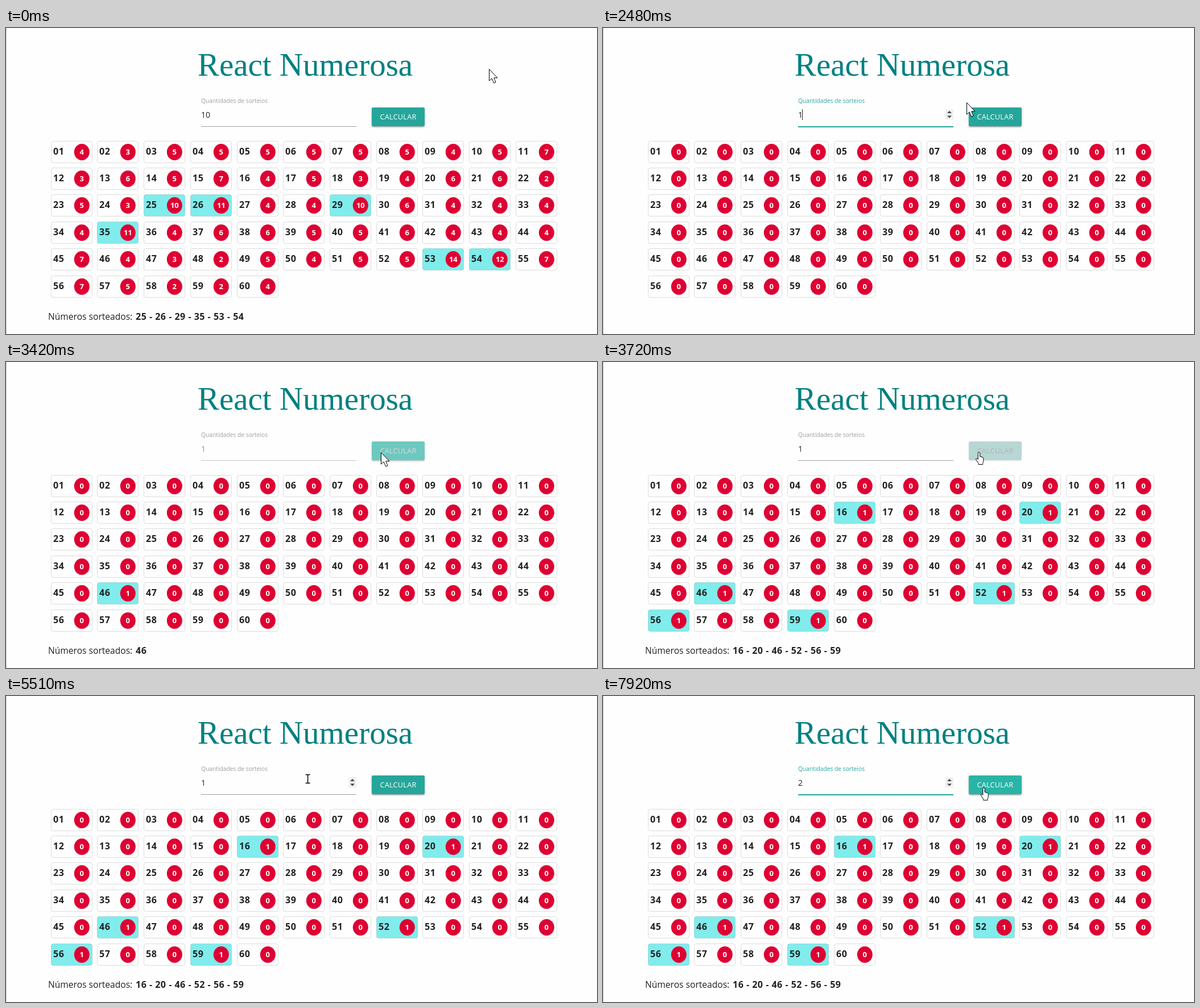
An HTML page that plays this animation: 1039x539 px, repeating every 8000 ms.

```html
<!DOCTYPE html>
<html lang="pt">
<head>
<meta charset="utf-8">
<title>React Numerosa</title>
<style>
html, body { margin: 0; width: 100%; height: 100%; overflow: hidden; background: #fefefe; }
#button {
  position: absolute; left: 643px; top: 140px; width: 93px; height: 33px; border-radius: 2px;
  box-shadow: 0 2px 2px rgba(0,0,0,calc(.14*var(--lift))),
              0 3px 1px -2px rgba(0,0,0,calc(.12*var(--lift))),
              0 1px 4px rgba(0,0,0,calc(.2*var(--lift)));
}
svg { position: absolute; left: 0; top: 0; display: block; }
text { font-family: "Open Sans", "Noto Sans", sans-serif; fill: #212121; white-space: pre; }
.title { font: 57px "Liberation Serif", serif; fill: #008080; text-anchor: middle; }
.bold { font-weight: 700; font-size: 16px; letter-spacing: .5px; }
.badge { font-weight: 700; font-size: 13px; fill: #fff; text-anchor: middle; }
</style>
</head>
<body>
<div id="button"></div>
<svg id="stage" width="1039" height="539"></svg>
<script>
const LOOP = 8000, CLEAR = 1100, BLUR = 3110, DRAW = 3410, UNLOCK = 3680, REFOCUS = 5820, RETYPE = 6900;
const TEAL = [38, 166, 154], HOVER = [43, 187, 173], OFF = [223, 223, 223], GREY = [158, 158, 158], WHITE = [255, 255, 255];

const firstDraw = { 25: 10, 26: 11, 29: 10, 35: 11, 53: 14, 54: 12 };
const secondDraw = [46, 16, 59, 52, 20, 56];

// Pointer key points: [time, x, y]
const route = [
  [2060, 849.5, 72.5], [2250, 717.5, 119.5], [2420, 717.5, 119.5], [2480, 639.5, 131.5],
  [2950, 659.5, 159.5], [5500, 659.5, 159.5], [5510, 531, 146], [5660, 466, 144],
  [7740, 466, 144], [7830, 711, 161], [7920, 668, 162.5]];

const stage = document.getElementById('stage');
const button = document.getElementById('button');

const clamp = v => Math.min(1, Math.max(0, v));
const within = (t, a, b) => t >= a && t < b;
const mix = (a, b, k) => a.map((v, i) => v + (b[i] - v) * k);
const rgb = c => `rgb(${c.map(Math.round)})`;
const ramp = (t, start) => 1 - (1 - clamp((t - start) / 300)) ** 1.7;

let seed = 7;
const random = () => (seed = seed * 16807 % 2147483647) / 2147483647;

function set(el, attrs) {
  for (const key in attrs) el.setAttribute(key, attrs[key]);
}
function add(tag, attrs, content) {
  const el = document.createElementNS('http://www.w3.org/2000/svg', tag);
  set(el, attrs);
  if (content !== undefined) el.textContent = content;
  return stage.appendChild(el);
}
const show = (el, on) => el.style.display = on ? '' : 'none';

add('rect', { width: 1, height: 539, fill: '#ccc' });
add('text', { class: 'title', x: 526, y: 84 }, 'React Numerosa');

const label = add('text', { x: 343, y: 132, 'font-size': 10.25 }, 'Quantidades de sorteios');
const value = add('text', { x: 343, y: 158, 'font-size': 14 });
const caret = add('rect', { y: 143, width: 1, height: 19, fill: '#222' });
const line = add('rect', { x: 343, y: 173, width: 273, height: 1 });
const glow = add('rect', { x: 343, y: 174, width: 273, height: 1, fill: rgb(TEAL) });
const spinner = [
  add('rect', { x: 602, y: 143, width: 14, height: 18, fill: '#f0f0f0' }),
  add('path', { d: 'M605 150l4-4 4 4zM605 154.5l4 4 4-4z', fill: '#444' })];
const caption = add('text', { x: 657.5, y: 161, 'font-size': 12.6, 'letter-spacing': .3 }, 'CALCULAR');

const cells = Array.from({ length: 60 }, (_, i) => {
  const x = Math.round(78.7 + i % 11 * 81.7);
  const y = Math.round(198.6 + Math.floor(i / 11) * 47.4);
  const box = add('rect', { x: x + .5, y: y + .5, width: 72, height: 38, rx: 3.5, stroke: '#000', 'stroke-opacity': .13 });
  add('text', { class: 'bold', x: x + 4, y: y + 23.5 }, String(i + 1).padStart(2, '0'));
  add('ellipse', { cx: x + 54.3, cy: y + 19.5, rx: 13.5, ry: 14.5, fill: '#de0032' });
  const count = add('text', { class: 'badge', x: x + 54.3, y: y + 24 });
  return { box, count, before: firstDraw[i + 1] || 2 + Math.floor(3 * (random() + random())) };
});

const heading = add('text', { x: 74, y: 514, 'font-size': 15.6, 'font-weight': 500 }, 'Números sorteados:');
const result = add('text', { class: 'bold', x: 228, y: 514 });

const solid = { fill: '#fff', stroke: '#000', 'stroke-width': 1 };
const cursors = {
  arrow: add('path', { ...solid, d: 'M0 0V20.5L4.7 16.5L8.2 24.5L11.5 23L8.2 15.3H14.5Z' }),
  hand: add('path', { ...solid, d: 'M-.2 12V1a1.7 1.7 0 0 1 3.4 0V7a1.4 1.4 0 0 1 2.2 .6V8' +
    'a1.4 1.4 0 0 1 2.2 .7a1.2 1.2 0 0 1 1.7 1.2V15q0 2-1.2 4V21H.7V19L-3.5 12.6a1.5 1.5 0 0 1 2.4-1.8Z' }),
  beam: add('path', { fill: 'none', stroke: '#000', 'stroke-width': 1.5,
    d: 'M-4-7.5H-1L0-6.5L1-7.5H4M0-6.5V6.5M-4 7.5H-1L0 6.5L1 7.5H4' })
};

function pointerAt(t) {
  const next = route.findIndex(point => point[0] > t);
  if (next < 1) return (next ? route[route.length - 1] : route[0]).slice(1);
  const [start, ...from] = route[next - 1], [end, ...to] = route[next];
  return mix(from, to, (t - start) / (end - start));
}

function pointerShape(x, y, locked) {
  if (within(x, 643, 736) && within(y, 140, 173)) return locked ? 'arrow' : 'hand';
  return within(x, 343, 616) && within(y, 135, 173) ? 'beam' : 'arrow';
}

function drawGrid(t) {
  const drawn = t < CLEAR
    ? Object.keys(firstDraw).map(Number)
    : secondDraw.filter((_, i) => t >= DRAW + i * 50).sort((a, b) => a - b);
  cells.forEach(({ box, count, before }, i) => {
    const hit = drawn.includes(i + 1);
    box.setAttribute('fill', hit ? '#80ecec' : '#fefefe');
    count.textContent = t < CLEAR ? before : Number(hit);
  });
  show(heading, drawn.length);
  result.textContent = drawn.join(' - ');
}

function typedText(t) {
  if (t < CLEAR) return '10';
  if (t < RETYPE) return '1';
  return t < RETYPE + 70 ? '' : '2';
}

function caretVisible(t) {
  const since = t < REFOCUS ? CLEAR - 55 : t < RETYPE ? REFOCUS : RETYPE + 20;
  return Math.floor(Math.max(0, t - since) / 530) % 2 === 0;
}

function drawForm(t, locked, shape) {
  const focused = within(t, CLEAR, BLUR) || t >= REFOCUS;
  const focus = ramp(t, 1050) - ramp(t, 3060) + ramp(t, 5750);
  const hover = ramp(t, 2560) - ramp(t, 5200) + ramp(t, 7780);
  const disabled = ramp(t, 3350) - ramp(t, UNLOCK);
  const accent = rgb(mix(GREY, TEAL, focus));
  const text = typedText(t);

  value.textContent = text;
  value.style.fill = locked ? '#949494' : '#212121';
  label.style.fill = accent;
  line.setAttribute('fill', locked ? '#c4c4c4' : accent);
  glow.setAttribute('opacity', focus ** 2);
  caret.setAttribute('x', text ? 350 : 344);
  show(caret, focused && caretVisible(t));
  spinner.forEach(el => show(el, focused || shape === 'beam'));

  button.style.background = rgb(mix(mix(TEAL, HOVER, hover), OFF, disabled));
  button.style.setProperty('--lift', 1 - disabled);
  caption.style.fill = rgb(mix(WHITE, GREY, disabled));
}

const begin = performance.now();
function render() {
  const t = (performance.now() - begin) % LOOP;
  const locked = within(t, 3400, UNLOCK);
  const [x, y] = pointerAt(t);
  const shape = pointerShape(x, y, locked);
  drawGrid(t);
  drawForm(t, locked, shape);
  for (const name in cursors) show(cursors[name], name === shape);
  set(cursors[shape], { transform: `translate(${x} ${y})` });
  requestAnimationFrame(render);
}
render();
</script>
</body>
</html>
```
